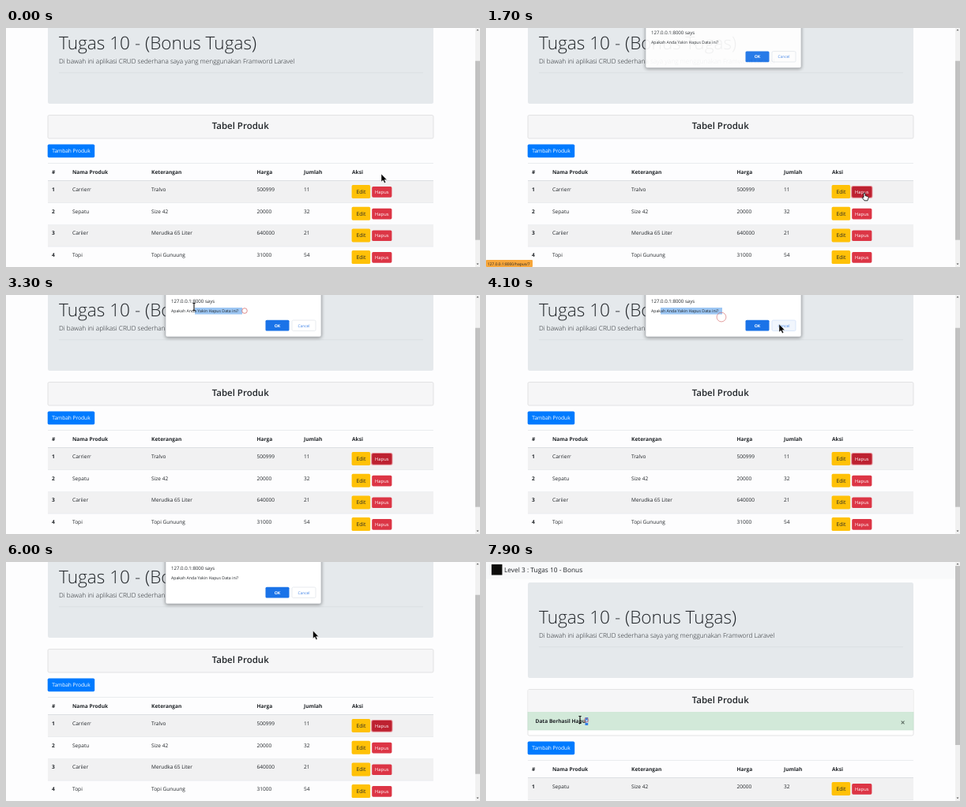
An HTML page that plays this animation: 600x303 px, repeating every 8000 ms.

```html
<!DOCTYPE html>
<html lang="id">
<head>
<meta charset="utf-8">
<title>Tabel Produk</title>
<style>
html, body { margin: 0; width: 100%; height: 100%; overflow: hidden; background: #fdfdfe; }
svg { display: block; width: 600px; height: 303px; }
text { font-family: "Open Sans", "Noto Sans", sans-serif; white-space: pre; text-rendering: geometricPrecision; }
</style>
</head>
<body>
<svg id="stage" viewBox="0 0 600 303"></svg>
<script>
const LOOP = 8000, STEP = 100, RELOAD = 7000;
const INK = '#212529';
const stage = document.getElementById('stage');

const products = [
  ['Carrierr', 'Tralvo', '500999', '11'],
  ['Sepatu', 'Size 42', '20000', '32'],
  ['Cariier', 'Merudka 65 Liter', '640000', '21'],
  ['Topi', 'Topi Gunuung', '31000', '54'],
];
const columns = [58, 84, 184, 317.5, 377, 438];
const ROW = 27.7;

// Pointer: time, x, y
const path = [
  [0, 475, 185], [200, 479, 207], [500, 470, 284], [700, 434, 245], [900, 477, 211],
  [1200, 482, 210], [1500, 479, 209], [1850, 479, 209], [2300, 350, 60], [2600, 305, 20],
  [3200, 302, 20], [3300, 238, 15], [3400, 221, 16], [3600, 222, 17], [3800, 298, 28],
  [3900, 300, 28], [4100, 371, 37], [4300, 371, 38], [4700, 468, 190], [4900, 477, 206],
  [5500, 477, 206], [5800, 430, 130], [6200, 347, 44], [6400, 337, 42], [6900, 337, 42],
  [7200, 337, 55], [7700, 139, 202], [7800, 135, 201], [7900, 119, 200], [8000, 119, 200],
];
const clicks = [1250, 3200, 3800, 4150, 5100, 6350, 7850];
const dialogs = [[1560, 4300], [5390, 6500]];
const linkTips = [[1000, 1900], [4900, 5600]];

const within = (v, a, b) => v >= a && v < b;
const active = (spans, t) => spans.find(([a, b]) => within(t, a, b));
const rect = (x, y, w, h, fill, extra = '') =>
  `<rect x="${x}" y="${y}" width="${w}" height="${h}" fill="${fill}" ${extra}/>`;
const text = (x, y, s, size, weight = 400, fill = INK, anchor = 'start') =>
  `<text x="${x}" y="${y}" font-size="${size}" font-weight="${weight}" fill="${fill}" text-anchor="${anchor}">${s}</text>`;
const group = (y, body, extra = '') => `<g transform="translate(0 ${y})" ${extra}>${body}</g>`;

function pointerAt(t) {
  const i = Math.max(1, path.findIndex(k => k[0] >= t));
  const [t0, x0, y0] = path[i - 1], [t1, x1, y1] = path[i];
  const p = (t - t0) / (t1 - t0);
  return { x: x0 + (x1 - x0) * p, y: y0 + (y1 - y0) * p };
}

function header() {
  return rect(0, 0, 594, 21.5, '#f8f9fa') + rect(7, 3, 13.5, 13.5, '#0c0c0a') +
    text(23, 13, 'Level 3 : Tugas 10 - Bonus', 8.36) +
    rect(53, 26, 488, 121, '#e5e9ec', 'rx="2.5"') +
    text(67, 78.2, 'Tugas 10 - (Bonus Tugas)', 22.6, 300) +
    text(67, 95.8, 'Di bawah ini aplikasi CRUD sederhana saya yang menggunakan Framword Laravel', 8.2, 300) +
    rect(67, 107.5, 461, .7, '#d8dcdf');
}

function card(t, reloaded) {
  const border = 'stroke="#dcdcdd" stroke-width=".8" rx="1.8"';
  let out = rect(53, 161.5, 488, reloaded ? 58.5 : 29.5, reloaded ? '#fff' : '#f6f6f7', border);
  if (reloaded) {
    const selected = t >= 7900;
    out += rect(53.4, 162, 487.2, 28, '#f6f6f7') +
      rect(53, 190.5, 488, 22.5, '#d2e9d9', 'stroke="#c3e2cc" stroke-width=".6"') +
      (selected ? rect(125.5, 197, 3.7, 10, '#2f7fe6') : '') +
      text(62.5, 204.3, `Data Berhasil Hapu<tspan fill="${selected ? '#fff' : INK}">s</tspan>`, 6.6, 700) +
      text(527.5, 206.5, '×', 10, 600, '#4b5a51', 'middle');
  }
  return out + text(296.7, 179.4, 'Tabel Produk', 11.5, 600, INK, 'middle');
}

function button(x, y, w, h, label, size, fill, color, ring) {
  const glow = ring ? rect(x - 1, y - 1, w + 2, h + 2, '#e58a93', 'rx="2.5"') : '';
  return glow + rect(x, y, w, h, fill, 'rx="1.7"') +
    text(x + w / 2, y + h / 2 + size * .36, label, size, 400, color, 'middle');
}

function table(rows, hover, focused) {
  let out = button(52.7, 147.6, 59.5, 16.7, 'Tambah Produk', 6.58, '#007bff', '#fff') +
    rect(53, 171, 488, .6, '#dee2e6') + rect(53, 193, 488, 1, '#dcdfe3');
  ['#', 'Nama Produk', 'Keterangan', 'Harga', 'Jumlah', 'Aksi'].forEach((name, i) => {
    out += text(columns[i], 185, name, 6.6, 700);
  });
  rows.forEach((cells, r) => {
    const y = 194 + r * ROW;
    out += r % 2 ? '' : rect(53, y, 488, ROW, '#f1f1f2');
    out += rect(53, y + ROW - .3, 488, .5, '#dfe2e6');
    out += text(columns[0], y + 13, r + 1, 6.6, 700);
    cells.forEach((s, i) => out += text(columns[i + 1], y + 13, s, 6.55));
    const hot = hover && hover.row === r && hover.kind;
    const focus = focused && r === 0;
    out += button(437.6, y + 5, 23.6, 17, 'Edit', 6.7, hot === 'edit' ? '#e0a800' : '#ffc107', INK);
    out += button(463.2, y + 7, 25.2, 13.7, 'Hapus', 5.8,
      hot === 'delete' || focus ? '#bd2130' : '#dc3545', '#fff', focus);
  });
  return out;
}

function scrollbar(reloaded) {
  return rect(594, 0, 6, 303, '#f1f1f1') + rect(594, reloaded ? 5 : 41.7, 6, 227, '#c1c1c1') +
    '<path d="M595.5 3.2L597 1.4 598.5 3.2ZM595.5 298.5L597 300.3 598.5 298.5Z" fill="#555"/>';
}

function dialog(t, span, pointer) {
  const p = Math.min(1, (t - span[0]) / 200);
  const left = Math.max(221, 299 - (t - 3200) * .6);
  const selected = span === dialogs[0] && t > 3200;
  const hot = within(pointer.y, 32, 46) && within(pointer.x, 362, 392);
  const body =
    rect(202, -10, 197, 63, '#fff', 'rx="2" stroke="#b9bcc0" stroke-width=".7" filter="drop-shadow(0 1px 2px #0006)"') +
    text(209, 10.2, '127.0.0.1:8000 says', 6.1) +
    (selected ? rect(left, 16, 299 - left, 8.5, '#9cc6f3') : '') +
    text(209, 22.2, 'Apakah Anda Yakin Hapus Data ini?', 5.2) +
    rect(328.5, 31.8, 30, 13.8, '#1a73e8', 'rx="1.5"') +
    text(343.5, 40.6, 'OK', 5.2, 700, '#fff', 'middle') +
    rect(362, 32, 30, 13.4, hot ? '#f1f6fd' : '#fff', `rx="1.5" stroke="${hot ? '#cddff8' : '#dfe2e8'}" stroke-width=".7"`) +
    text(377, 40.5, 'Cancel', 4.9, 400, '#3f82e6', 'middle');
  return group(-8 * (1 - p), body, `opacity="${Math.min(1, p * 1.33)}"`);
}

function buttonUnder({ x, y }, shift, count) {
  const row = Math.floor((y - shift - 194) / ROW);
  const inner = y - shift - 194 - row * ROW;
  if (!within(row, 0, count) || !within(inner, 6, 21)) return null;
  if (within(x, 438, 461)) return { row, kind: 'edit' };
  return within(x, 463.5, 488.2) ? { row, kind: 'delete' } : null;
}

function overText({ x, y }, open, reloaded) {
  if (open) return within(x, 207, 304) && within(y, 14, 25);
  const scroll = reloaded ? 0 : -51;
  return within(x, 67, 368) && within(y - scroll, 86, 99) ||
    reloaded && within(x, 62, 142) && within(y, 195, 208);
}

function cursor({ x, y }, shape) {
  const shapes = {
    arrow: '<path d="M0 0V10L2.3 8 4 11.5 5.7 10.7 4.1 7.4H7.2Z" fill="#000" stroke="#fff" stroke-width=".5"/>',
    hand: '<path d="M-1 .8Q0-.6 1 .8V3.6L4.2 4.5Q5.3 5 5 6.6L4 9.8H0L-2.8 6.2Q-2.8 4.9-1 5.9Z" fill="#fff" stroke="#000" stroke-width=".8"/>',
    beam: '<path d="M-1.6-4.5H1.6M0-4.5V4.5M-1.6 4.5H1.6" fill="none" stroke="#111" stroke-width="1.1"/>',
  };
  return `<g transform="translate(${x} ${y})">${shapes[shape]}</g>`;
}

function ripple(t) {
  const start = clicks.find(c => within(t, c, c + 450));
  if (start === undefined) return '';
  const { x, y } = pointerAt(start), age = t - start;
  return `<circle cx="${x}" cy="${y}" r="${2 + age * .013}" fill="none" stroke="#d46a6a" stroke-width=".9" opacity="${.9 - age / 1500}"/>`;
}

function scene(t) {
  const reloaded = t >= RELOAD;
  const pointer = pointerAt(t);
  const open = active(dialogs, t);
  const shift = reloaded ? 80 : 0;
  const rows = reloaded ? products.slice(1) : products;
  const focused = within(t, 1300, RELOAD);
  const under = buttonUnder(pointer, shift, rows.length);
  const hover = open ? null : under;
  const fresh = open && t - open[0] < 300;
  const shape = hover || under && fresh ? 'hand' : overText(pointer, open, reloaded) ? 'beam' : 'arrow';
  return group(reloaded ? 0 : -51, header() + card(t, reloaded)) +
    group(shift, table(rows, hover, focused)) +
    scrollbar(reloaded) +
    (active(linkTips, t) ? rect(0, 294, 59, 9, '#f7a63a', 'rx="1"') + text(2, 300.6, '127.0.0.1:8000/hapus/7', 4.9) : '') +
    (open ? dialog(t, open, pointer) : '') +
    ripple(t) + cursor(pointer, shape);
}

let shown = -1;
const began = performance.now();
function draw() {
  const t = Math.floor((performance.now() - began) % LOOP / STEP) * STEP;
  if (t !== shown) stage.innerHTML = scene(shown = t);
  requestAnimationFrame(draw);
}
draw();
</script>
</body>
</html>
```
